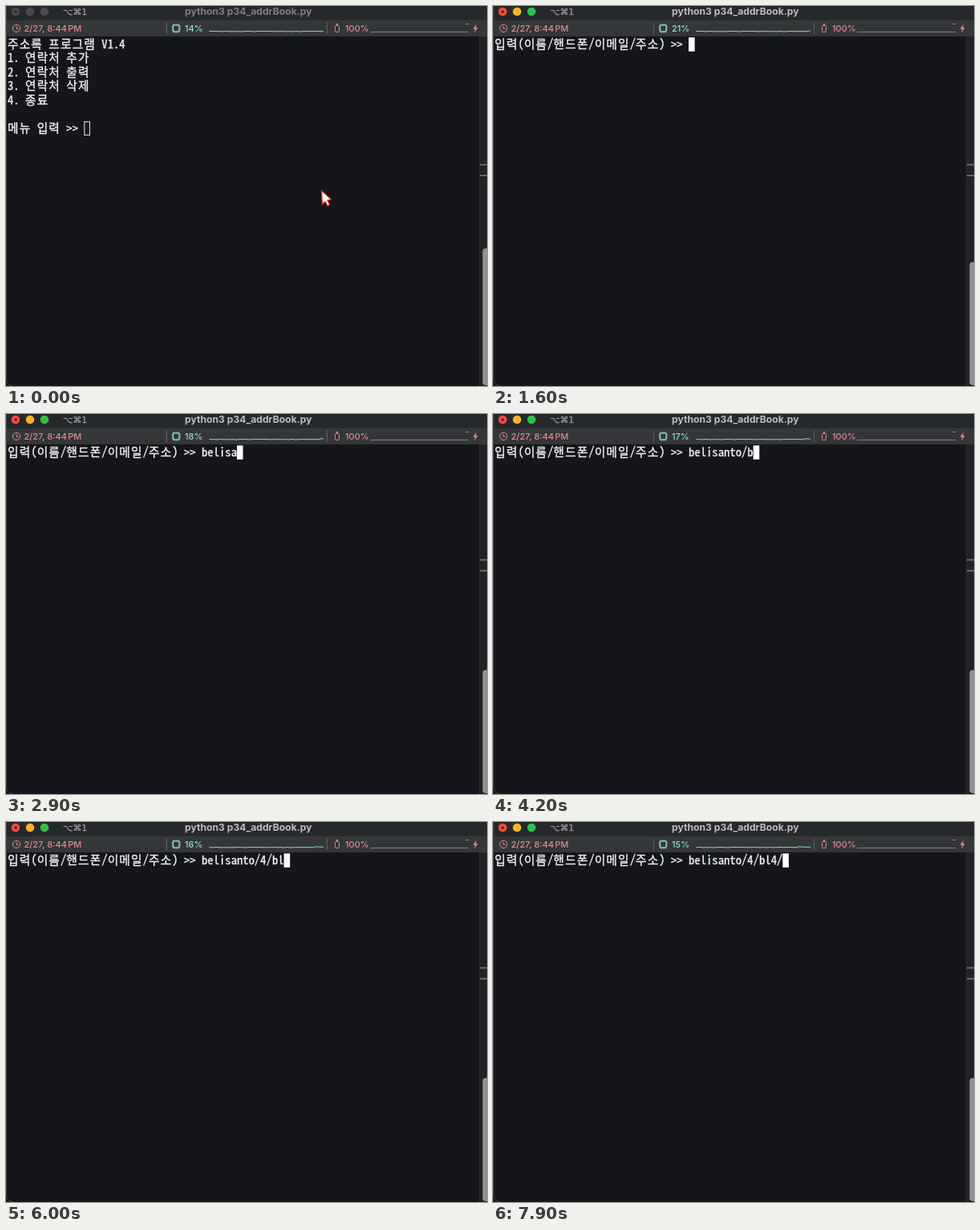
An HTML page that plays this animation: 600 px wide and 475 px high, repeating every 8000 ms.

```html
<!DOCTYPE html>
<html lang="ko">
<head>
<meta charset="utf-8">
<title>Address book terminal</title>
<style>
  html, body { margin: 0; width: 100%; height: 100%; overflow: hidden; background: #14161b; }
  svg { display: block; width: 600px; height: 475px; }
  text { white-space: pre; }
  .term {
    font: 14.67px "Noto Sans Mono CJK KR", "Noto Sans CJK KR", "Noto Sans CJK", monospace;
    font-feature-settings: "hwid"; fill: #f0f0f0; stroke: #f0f0f0; stroke-width: .35px;
  }
  .ui { font: 500 11px Inter, Roboto, sans-serif; }
  .title { font: 700 12.15px Inter, Roboto, sans-serif; text-anchor: middle; }
  .keys { font: 10.8px "DejaVu Sans", sans-serif; fill: #9a9c9e; stroke: #9a9c9e; stroke-width: .25px; }
  .rose { fill: #dc8b93; }
  .pink { fill: #de88a0; }
  .teal { fill: #8ce3c8; }
  .roseLine { fill: none; stroke: #dc8b93; }
  .pinkLine { fill: none; stroke: #de88a0; }
  .tealLine { fill: none; stroke: #8ce3c8; }
</style>
</head>
<body>
<svg viewBox="0 0 600 475">
  <rect width="600" height="475" fill="#14161b"/>

  <!-- title bar -->
  <rect width="600" height="18" fill="#26292c"/>
  <g id="lights">
    <circle cx="12" cy="7" r="5.3"/>
    <circle cx="30" cy="7" r="5.3"/>
    <circle cx="48" cy="7" r="5.3"/>
  </g>
  <circle id="dot" cx="12" cy="7" r="1.8"/>
  <text class="keys" x="71" y="11.3">⌥⌘1</text>
  <text id="title" class="title" x="302.3" y="11">python3 p34_addrBook.py</text>

  <!-- status bar -->
  <rect y="18" width="600" height="20" fill="#353638"/>
  <path d="M200.5 21v14M400.5 21v14" stroke="#606163"/>
  <circle class="roseLine" cx="13" cy="28" r="4.6"/>
  <path class="roseLine" d="M13 25v3.2h2.6"/>
  <text class="ui rose" x="22.5" y="31.5">2/27, 8:44<tspan dx="1.4">PM</tspan></text>

  <rect class="tealLine" x="208.5" y="24" width="7.5" height="8" stroke-width="1.3"/>
  <path class="tealLine" stroke-width=".9" d="M210 22.3v1.7M212.3 22.3v1.7M214.6 22.3v1.7
    M210 32v1.7M212.3 32v1.7M214.6 32v1.7M206.8 25.7h1.7M206.8 28h1.7M206.8 30.3h1.7
    M216 25.7h1.7M216 28h1.7M216 30.3h1.7"/>
  <text id="cpu" class="ui teal" x="223" y="31.5"></text>
  <path id="graph" class="tealLine"/>

  <rect class="pinkLine" x="410.5" y="24.5" width="5" height="8" rx="1"/>
  <rect class="pink" x="412" y="22" width="2" height="2"/>
  <text class="ui pink" x="423" y="31.5">100%</text>
  <path d="M454 32.5h123M573 22.5h4" stroke="#8f7f83"/>
  <path class="pink" d="M587 22.5l-4.5 6h2.6l-1 5 4.4-6.5h-2.6z"/>

  <!-- right edge -->
  <rect x="591" y="38" width="9" height="437" fill="#202227"/>
  <path d="M590.5 38v437" stroke="#292a2d"/>
  <path id="dividers" d="M591 0h9M591 13.5h9" stroke="#707173" stroke-width="1.8"/>
  <rect id="thumb" x="594.5" width="12" rx="4" fill="#909192"/>

  <path d="M.5 0v466q0 8.5 8.5 8.5" fill="none" stroke="#3d3f41"/>

  <g id="lines"></g>
  <rect id="cursor"/>
  <path id="mouse" d="M393.5 230.5l1 17.5 3.6-3.6 2.8 5.4 2.8-1.5-2.6-5.3 4.5-1.2z"
    fill="#fff" stroke="#d3281f" stroke-width="1.4" stroke-linejoin="round"/>
</svg>

<script>
const LOOP = 8000, CELL = 7.333, LEFT = 2, TOP = 39.3, ROW = 17.5;
const FOCUS = 400, MOUSE_HIDDEN = 900, CLEAR = 1300, SHIFT = 1700;
const CPU_START = 1100, CPU_EVERY = 1250, GAP = 2.85;

const menu = ["주소록 프로그램 V1.4", "1. 연락처 추가", "2. 연락처 출력", "3. 연락처 삭제",
  "4. 종료", "", "메뉴 입력 >> "];
const prompt = "입력(이름/핸드폰/이메일/주소) >> ";

// [time, key]; "<" deletes the last character
const keys = [
  [1900, "b"], [2100, "e"], [2300, "l"], [2450, "i"], [2600, "s"], [2800, "a"],
  [3000, "n"], [3200, "t"], [3400, "o"], [3700, "/"], [4000, "b"], [4400, "<"],
  [4600, "4"], [5000, "/"], [5600, "b"], [5900, "l"], [6500, "4"], [7100, "/"]
];
const load = [14, 21, 18, 17, 16, 16, 15];

const $ = id => document.getElementById(id);
const set = (el, attrs) => { for (const k in attrs) el.setAttribute(k, attrs[k]); };
const cells = ch => ch >= "\u1100" ? 2 : 1;
const widthOf = s => [...s].reduce((n, ch) => n + cells(ch), 0);

function random(seed) {
  const v = Math.sin(seed * 12.9898) * 43758.5453;
  return v - Math.floor(v);
}

function makeLine(s, row) {
  const el = document.createElementNS("http://www.w3.org/2000/svg", "text");
  let col = 0;
  const xs = [...s].map(ch => {
    const x = LEFT + col * CELL;
    col += cells(ch);
    return x.toFixed(2);
  });
  set(el, { class: "term", x: xs.join(" "), y: TOP + 13.2 + row * ROW });
  el.textContent = s;
  return el;
}

function screenAt(t) {
  if (t < CLEAR) {
    const rows = menu.slice();
    if (t >= 1000) rows[6] += "1";
    return rows;
  }
  let typed = "";
  for (const [at, key] of keys) {
    if (at > t) break;
    typed = key === "<" ? typed.slice(0, -1) : typed + key;
  }
  return [prompt + typed];
}

function drawTerminal(t, focused) {
  const rows = screenAt(t), last = rows.length - 1;
  $("lines").replaceChildren(...rows.map(makeLine));
  const inset = focused ? 0 : 0.5;
  set($("cursor"), {
    x: LEFT + widthOf(rows[last]) * CELL + inset,
    y: TOP + last * ROW + inset,
    width: 7.6 - inset * 2, height: 17.5 - inset * 2,
    fill: focused ? "#fff" : "none",
    stroke: focused ? "none" : "#f0f0f0"
  });
}

function drawLoad(t) {
  const step = t < CPU_START ? 0 : 1 + Math.floor((t - CPU_START) / CPU_EVERY);
  $("cpu").textContent = load[step] + "%";
  let d = "";
  for (let i = 0; i < 51; i++) {
    const n = step - 50 + i;
    const value = n >= 0 ? load[n] : 9 + 6 * random(n);
    d += (i ? "L" : "M") + (253.5 + i * GAP).toFixed(2) + " " + (32.9 - value * 0.1).toFixed(2);
  }
  set($("graph"), { d });
}

function drawChrome(t, focused) {
  const colors = focused ? ["#f64b43", "#f4b32f", "#35c149"] : ["#484b4d", "#484b4d", "#484b4d"];
  [...$("lights").children].forEach((c, i) => set(c, { fill: colors[i] }));
  set($("dot"), { fill: focused ? "#7c120e" : "#25282a" });
  set($("title"), { fill: focused ? "#bcbdbe" : "#7c7f81" });
  set($("dividers"), { transform: `translate(0 ${t < SHIFT ? 198.3 : 182.3})` });
  const top = t < CLEAR ? 303 : 320;
  set($("thumb"), { y: top, height: 474 - top });
  set($("mouse"), { visibility: t < MOUSE_HIDDEN ? "visible" : "hidden" });
}

let shown = -1;
function frame() {
  const t = Math.floor(performance.now() % LOOP / 50) * 50;
  if (t !== shown) {
    shown = t;
    const focused = t >= FOCUS;
    drawTerminal(t, focused);
    drawLoad(t);
    drawChrome(t, focused);
  }
  requestAnimationFrame(frame);
}
frame();
</script>
</body>
</html>
```
